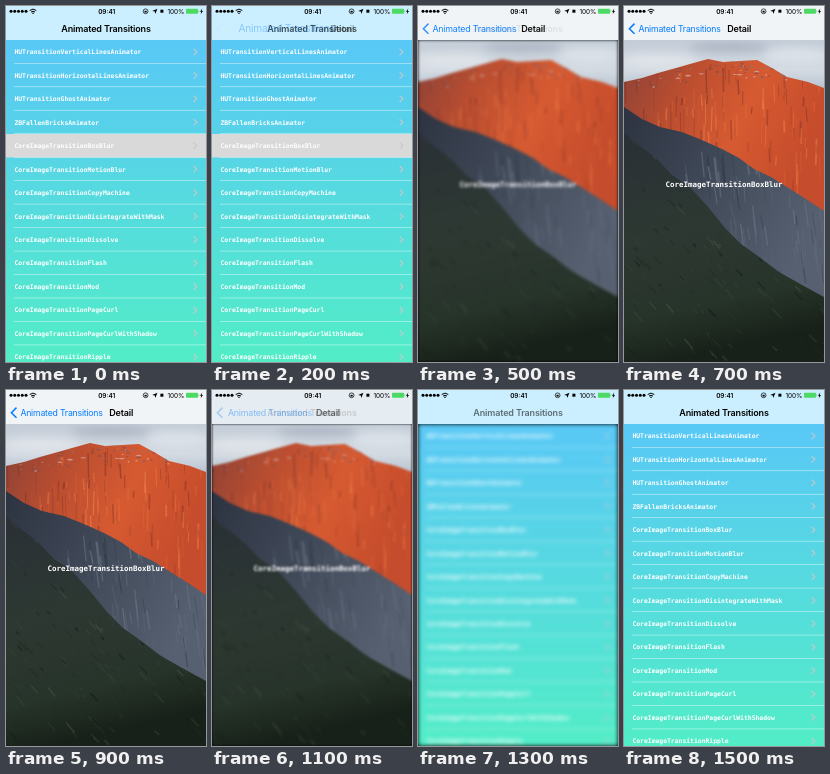
An HTML page for the animation above (1600 ms loop, 200 by 356 pixels).

```html
<!DOCTYPE html>
<html lang="en">
<head>
<meta charset="utf-8">
<title>Box blur transition</title>
<style>
  html, body { margin: 0; width: 100%; height: 100%; overflow: hidden; background: #000; }
  svg { display: block; width: 100vw; height: 100vh; }
  text { font-family: Inter, Roboto, sans-serif; white-space: pre; }
  .mono { font-family: "DejaVu Sans Mono", monospace; font-weight: 700; fill: #fff; }
  .title { font-size: 9px; font-weight: 600; letter-spacing: -.14px; }
  .back { letter-spacing: -.2px; fill: #007aff; }
  .status { font-size: 6.4px; }
</style>
</head>
<body>
<svg viewBox="0 0 200 356" preserveAspectRatio="none">
  <defs>
    <linearGradient id="sea" x2="0" y2="1">
      <stop stop-color="#59c8f6"/><stop offset="1" stop-color="#52edc7"/>
    </linearGradient>
    <linearGradient id="sky" x2="0" y2="1">
      <stop stop-color="#c3ccd7"/><stop offset=".5" stop-color="#d3dae2"/><stop offset="1" stop-color="#a9b6c6"/>
    </linearGradient>
    <linearGradient id="glow" x1="0" y1="0" x2="1" y2=".35">
      <stop stop-color="#8d4237"/><stop offset=".3" stop-color="#b84d30"/>
      <stop offset=".65" stop-color="#d65a31"/><stop offset="1" stop-color="#c54c2c"/>
    </linearGradient>
    <linearGradient id="shade" x2="1" y2=".5">
      <stop stop-color="#2c3240"/><stop offset=".5" stop-color="#414a59"/><stop offset="1" stop-color="#566070"/>
    </linearGradient>
    <linearGradient id="slope" x2=".2" y2="1">
      <stop stop-color="#2a3036"/><stop offset=".45" stop-color="#2d3832"/>
      <stop offset=".8" stop-color="#27342a"/><stop offset="1" stop-color="#182119"/>
    </linearGradient>
    <filter id="soft" x="-20%" y="-60%" width="140%" height="220%"><feGaussianBlur stdDeviation="4"/></filter>
    <filter id="blur" filterUnits="userSpaceOnUse" x="0" y="34" width="200" height="322"
            color-interpolation-filters="sRGB"><feGaussianBlur id="amount" stdDeviation="0"/></filter>
    <clipPath id="view"><rect y="34" width="200" height="322"/></clipPath>
    <clipPath id="cliffClip"><use href="#cliff"/></clipPath>
    <clipPath id="wallClip"><use href="#wall"/></clipPath>
    <clipPath id="hillClip"><use href="#hill"/></clipPath>
  </defs>
  <rect width="200" height="356"/>

  <g id="list">
    <rect y="34" width="200" height="322" fill="url(#sea)"/>
    <g id="rows"></g>
  </g>

  <g id="photo">
    <g clip-path="url(#view)">
      <rect y="34" width="200" height="60" fill="url(#sky)"/>
      <g filter="url(#soft)">
        <ellipse cx="35" cy="55" rx="38" ry="7" fill="#e0e4e9"/>
        <ellipse cx="105" cy="41" rx="40" ry="5" fill="#aeb6c5"/>
        <ellipse cx="172" cy="50" rx="32" ry="8" fill="#dbe1e8"/>
      </g>
      <path id="wall" fill="url(#shade)" d="M0 97L40 112 80 130 120 150 160 172 200 190V300H0Z"/>
      <g id="wallMarks" clip-path="url(#wallClip)"></g>
      <path id="cliff" fill="url(#glow)" d="M0 76L18 72 34 67 52 62 66 58 84 53 99 56 116 55 133 54 148 62 163 71 184 76 200 82V205L182 193 163 181 147 171 130 163 115 152 98 143 78 134 58 126 36 121 18 113 0 101Z"/>
      <g id="cliffMarks" clip-path="url(#cliffClip)"></g>
      <path id="hill" fill="url(#slope)" d="M0 126L16 140 32 152 48 169 66 181 84 201 101 222 117 238 134 250 155 266 178 279 200 291V356H0Z"/>
      <g id="hillMarks" clip-path="url(#hillClip)"></g>
    </g>
    <text class="mono" x="100" y="181" font-size="7.47" text-anchor="middle">CoreImageTransitionBoxBlur</text>
  </g>

  <rect id="bar" width="200" height="34"/>
  <text id="title" class="title" x="100" y="26" text-anchor="middle">Animated Transitions</text>
  <text id="back" class="back" y="26">Animated Transitions</text>
  <path id="chevron" d="M10.5 17.6L5.4 22.7 10.5 27.8" fill="none" stroke="#007aff" stroke-width="1.5"/>
  <text id="detail" class="title" y="26">Detail</text>

  <g id="status">
    <g id="dots"></g>
    <g fill="none" stroke="#000" stroke-width="1">
      <path d="M23.7 4.5Q27 1.7 30.3 4.5M25 6.1Q27 4.4 29 6.1"/>
      <circle cx="139.6" cy="5.3" r="2.4" stroke-width=".7"/>
    </g>
    <circle cx="27" cy="7.3" r=".8"/>
    <rect x="138.5" y="4.8" width="2.2" height="1.7"/>
    <path d="M151.4 2.7L149.3 8 148.8 5.4 146.2 5Z"/>
    <rect x="154.4" y="3.7" width="3" height="3"/>
    <text class="status" x="100.7" y="7.8" font-weight="600" text-anchor="middle">09:41</text>
    <text class="status" x="161.4" y="7.8">100%</text>
    <rect x="180" y="2.8" width="12" height="5" rx=".8" fill="#4cd964"/>
    <rect x="192.4" y="4.4" width=".8" height="1.8" fill="#4cd964"/>
    <path d="M196.3 2.4L194 5.7H195.3L194.7 8.2 197 4.9H195.7Z"/>
  </g>
</svg>
<script>
const LOOP = 1600, STEP = 100, TOP = 34.13, ROW = 23.47;
const $ = id => document.getElementById(id);
const clamp = v => Math.min(1, Math.max(0, v));

function add(parent, tag, attrs, text) {
  const node = document.createElementNS("http://www.w3.org/2000/svg", tag);
  set(node, attrs);
  if (text) node.textContent = text;
  parent.appendChild(node);
  return node;
}
function set(node, attrs) {
  for (const key in attrs) node.setAttribute(key, attrs[key]);
}

let seed = 11;
function rand(lo, hi) {
  seed = (seed * 16807) % 2147483647;
  return lo + (hi - lo) * seed / 2147483647;
}
const pick = list => list[Math.floor(rand(0, list.length))];

function buildList() {
  const effects = "BoxBlur MotionBlur CopyMachine DisintegrateWithMask Dissolve Flash Mod PageCurl PageCurlWithShadow Ripple";
  const names = ["HUTransitionVerticalLinesAnimator", "HUTransitionHorizontalLinesAnimator",
    "HUTransitionGhostAnimator", "ZBFallenBricksAnimator",
    ...effects.split(" ").map(name => "CoreImageTransition" + name)];
  const rows = $("rows");
  add(rows, "rect", { id: "pressed", y: TOP + 4 * ROW, width: 200, height: ROW, fill: "#d9d9d9" });
  names.forEach((name, i) => {
    const y = TOP + i * ROW, mid = y + ROW / 2;
    add(rows, "text", { class: "mono", x: 8.4, y: mid + 2.4, "font-size": 6.4 }, name);
    add(rows, "path", { d: `M187.6 ${mid - 3.2}l3.3 3.2-3.3 3.2`, fill: "none", stroke: "#c7c7cc", "stroke-width": 1.1 });
    add(rows, "rect", { x: 8, y: y + ROW - .6, width: 192, height: .6, fill: "#fff", opacity: .65 });
  });
}

function streaks(id, count, box, length, colors, lean) {
  const [x0, y0, x1, y1] = box;
  for (let i = 0; i < count; i++) {
    const x = rand(x0, x1), y = rand(y0, y1), l = rand(...length);
    add($(id), "path", {
      d: `M${x} ${y}l${rand(-1, 1) + l * lean} ${l}`, stroke: pick(colors),
      "stroke-width": rand(.5, 1.8), opacity: rand(.2, .65)
    });
  }
}

function buildPhoto() {
  streaks("cliffMarks", 190, [0, 58, 200, 190], [6, 28], ["#f2824c", "#e8703c", "#8c3526", "#70302a", "#e25f32"], 0);
  // Snow along the ridge
  for (let i = 0; i < 60; i++) {
    const x = rand(8, 165), y = 55 + Math.abs(x - 105) * .17 + rand(-1, 14);
    add($("cliffMarks"), "ellipse", {
      cx: x, cy: y, rx: rand(.6, 3), ry: rand(.4, 1), fill: pick(["#d9c9cc", "#8a737c", "#6d4c50"]), opacity: .6
    });
  }
  streaks("wallMarks", 100, [60, 140, 200, 265], [8, 30], ["#727d8c", "#303846", "#657080"], .12);
  streaks("hillMarks", 210, [0, 130, 200, 350], [2, 10], ["#465043", "#141c19", "#3a4634", "#1b2421"], .9);
}

function blurAt(t) {
  const out = 1 - Math.abs(t - 440) / 250, home = 1 - Math.abs(t - 1260) / 245;
  return 2.3 * Math.max(0, out, home);
}

function navAt(t) {
  if (t < 1000) {
    const left = 1 - clamp((t - 100) / 550);
    const p = 1 - left ** 2, slide = left ** 6;
    return { title: left ** 2, detail: p, back: p, chevron: p ** 3,
      backX: 14.4 + 40 * slide, detailX: 103.2 + 50 * slide, size: 8.7 * (1 + .25 * left ** 2) };
  }
  const p = clamp((t - 1000) / 500), gone = clamp((t - 1000) / 220);
  return { title: p ** 1.2, detail: 1 - gone, back: (1 - gone) * .8, chevron: (1 - gone) ** 2,
    backX: 14.4 + 38 * p * p, detailX: 103.2 + 20 * p * p, size: 8.7 * (1 + .1 * p) };
}

function render(t) {
  const showPhoto = t >= 450 && t < 1250, blur = blurAt(t), nav = navAt(t);
  const active = showPhoto ? "photo" : "list";
  for (const id of ["list", "photo"]) {
    $(id).style.display = id === active ? "" : "none";
    set($(id), { filter: id === active && blur > .02 ? "url(#blur)" : "none" });
  }
  set($("amount"), { stdDeviation: blur });
  set($("pressed"), { opacity: t < 1000 ? 1 : 0 });
  set($("bar"), { fill: !showPhoto ? "#cbeffe" : t > 1000 ? "#e6edf2" : "#f0f4f7" });
  for (const id of ["title", "detail", "back", "chevron"]) set($(id), { opacity: nav[id] });
  set($("back"), { x: nav.backX, "font-size": nav.size });
  set($("detail"), { x: nav.detailX });
}

for (let i = 0; i < 5; i++) add($("dots"), "circle", { cx: 5 + i * 3.75, cy: 5.3, r: 1.5 });
buildList();
buildPhoto();

const start = performance.now();
let shown = -1;
function tick() {
  const t = Math.floor((performance.now() - start) % LOOP / STEP) * STEP;
  if (t !== shown) render(shown = t);
  requestAnimationFrame(tick);
}
tick();
</script>
</body>
</html>
```
